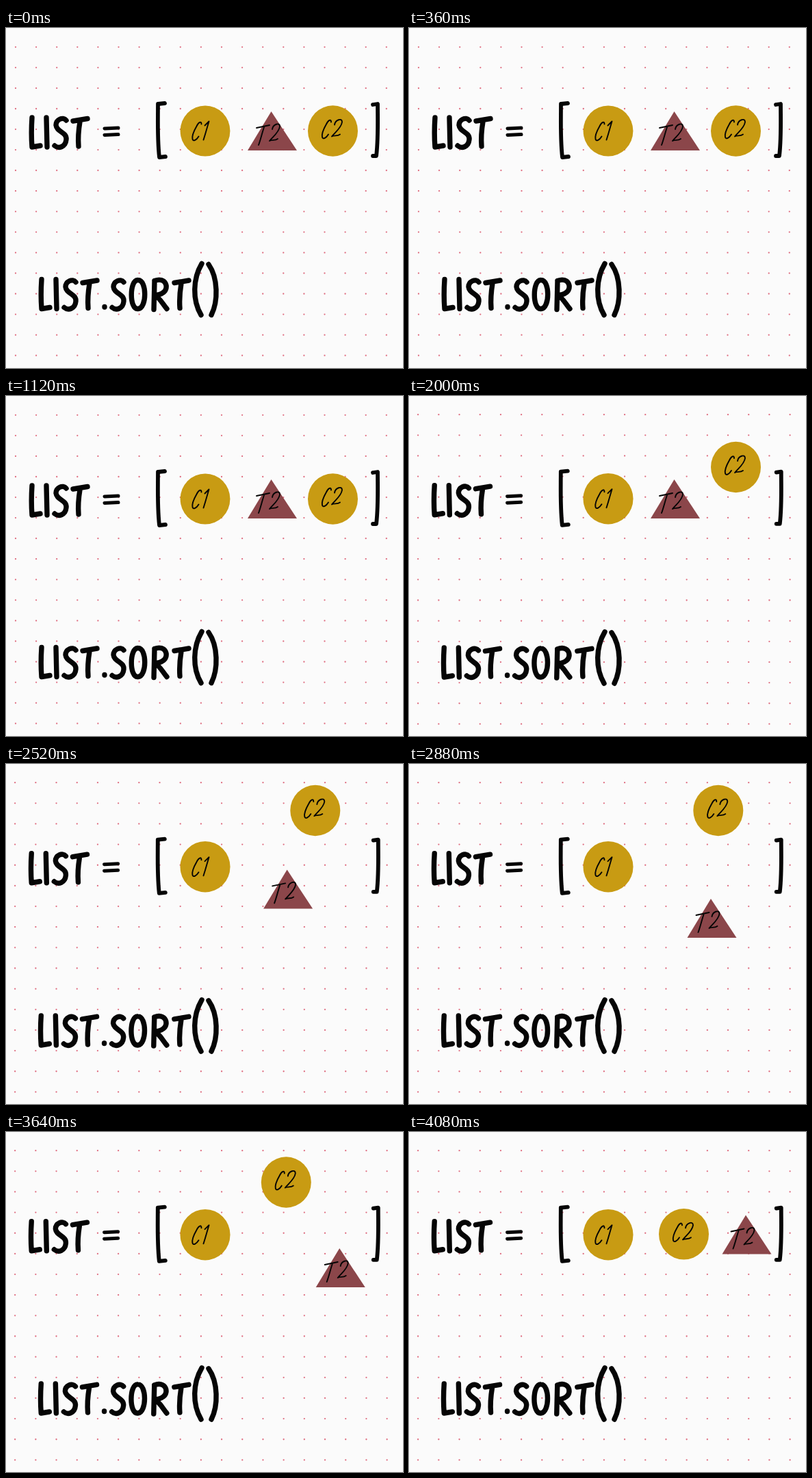
Recreate the animation shown at these times as an HTML page. Size 580 px wide and 497 px high, loop 4.12 s.

```html
<!DOCTYPE html>
<html lang="en">
<head>
<meta charset="utf-8">
<title>List sort</title>
<style>
  html, body { margin: 0; width: 100%; height: 100%; overflow: hidden; background: #fbfbfb; }
  svg { display: block; }
  path { fill: none; stroke: #050505; stroke-linecap: round; stroke-linejoin: round; }
  ellipse { fill: #c89b13; }
  polygon { fill: #8b464a; }
  #dots { stroke: #df6f82; stroke-width: 2.3; }
</style>
</head>
<body>
<svg width="580" height="497" viewBox="0 0 580 497" role="img" aria-label="LIST = [C1, T2, C2], LIST.SORT()">
  <g id="page">
    <path id="dots"/>
    <ellipse cx="291" cy="150.5" rx="36.4" ry="37.1"/>
  </g>
  <g id="triangle"><polygon points="387.5,122 353,179 425,179"/></g>
  <g id="disc"><ellipse cx="477.5" cy="150.5" rx="36.5" ry="37.2"/></g>
</svg>
<script>
const LOOP = 4120, STEP = 40;
const el = id => document.getElementById(id);

// Hand lettering: advance width and pen stroke.
const glyphs = {
  "L": [22, "M1 0C0 15 0 30 1 43L13 41"],
  "I": [12, "M0 0L1 43"],
  "S": [26, "M17 4C12-2 2 3 2 11C3 21 18 21 17 32C16 43 6 46 0 41"],
  "T": [30, "M1 5L22 1.5M11 6C9 18 8 29 9 42"],
  "O": [34, "M12 1C-1 0-1 45 12 43C25 42 25 1 12 1Z"],
  "R": [30, "M2 2L1 44M2 2C18-4 24 12 15 19C11 22 7 23 2 23C10 27 14 36 20 43"],
  ".": [14, "M3 40v.5"],
  "(": [21, "M11-23C-2-1-3 30 10 52"],
  ")": [21, "M0-22C14-2 14 32 4 52"],
  "=": [30, "M0 16L20 15M0 25.5L20 24.5"],
  "[": [20, "M11-21L1-20C1 6 0 32 3 58L12 57"],
  "]": [20, "M3-19L10-20C10 6 11 31 8 56L3 56"],
  "C": [14, "M13 4C13-1 9 1 6 7C2 14-1 22 0 26C1 30 6 27 9 22"],
  "1": [14, "M4 6L10 0C7 10 5 18 2 27"],
  "2": [14, "M4 8C5 1 15-3 15 4C14 12 6 18 0 25C4 23 8 25 12 22"],
  "t": [19, "M0 6L19 2M11 5C8 14 6 23 3 31"]
};

function write(parent, text, x, y, weight) {
  for (const letter of text) {
    const [advance, stroke] = glyphs[letter];
    const path = document.createElementNS("http://www.w3.org/2000/svg", "path");
    path.setAttribute("d", stroke);
    path.setAttribute("stroke-width", weight);
    path.setAttribute("transform", `translate(${x} ${y})`);
    el(parent).append(path);
    x += advance;
  }
}

write("page", "LIST", 37, 131, 7.4);
write("page", "=", 144, 131, 5);
write("page", "[", 221, 131, 5.8);
write("page", "]", 533, 131, 5.8);
write("page", "LIST.SORT()", 51, 367.5, 7.4);
write("page", "C1", 272.5, 136.5, 1.9);
write("disc", "C2", 462, 133.5, 1.9);
write("triangle", "t2", 366, 140, 1.9);

let grid = "";
for (let row = 0; row < 16; row++)
  for (let col = 0; col < 19; col++)
    grid += `M${14 + col * 30.1} ${27.8 + row * 30.06}h.01`;
el("dots").setAttribute("d", grid);

// Smooth 0 to 1 progress between two times.
function ease(time, start, end) {
  const u = Math.min(1, Math.max(0, (time - start) / (end - start)));
  return u * u * (3 - 2 * u);
}

const mix = (a, b, u) => a.map((v, i) => v + (b[i] - v) * u);

function place(id, points, progress) {
  const at = points.slice(1).reduce((from, to, i) => mix(from, to, progress[i]), points[0]);
  el(id).setAttribute("transform", `translate(${at})`);
}

function draw(now) {
  const time = Math.floor(now % LOOP / STEP) * STEP;
  const lifted = time >= 2000;
  const drop = ease(time, 3760, 4080);
  el("page").setAttribute("transform",
    `translate(290 248) scale(${lifted ? 1.003 : 1}) translate(-290 -248)`);
  place("disc", [[0, lifted ? -46.5 : 0], [-25.7, -82.5], [-68.2, -77], [-76, -1.2]],
    [ease(time, 2000, 2240), ease(time, 3080, 3320), drop]);
  place("triangle", [[0, 0], [53.5, 75], [99.7, 48], [104.5, -.5]],
    [ease(time, 2320, 2760), ease(time, 3440, 3640), drop]);
  requestAnimationFrame(draw);
}
draw(performance.now());
</script>
</body>
</html>
```
